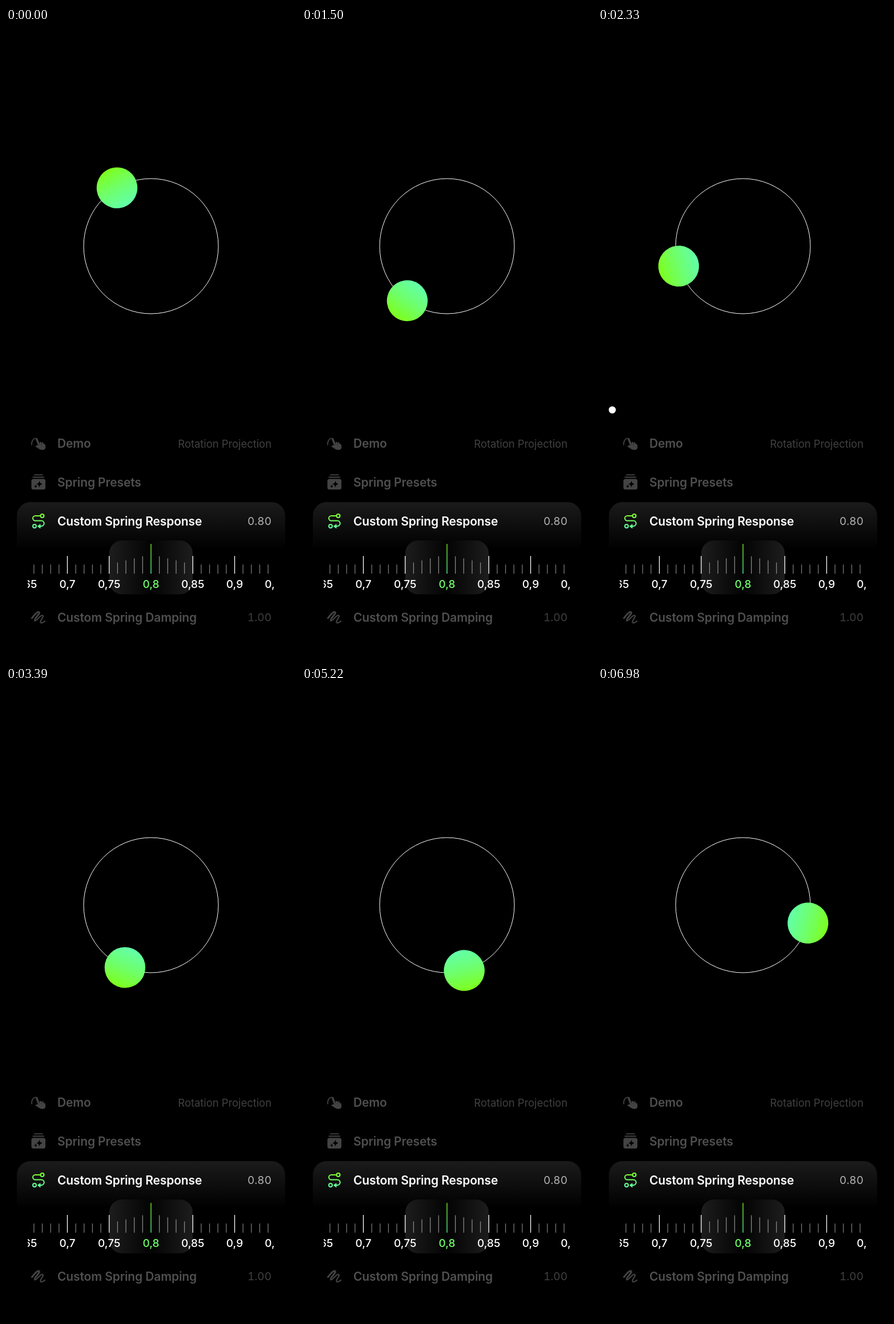
Write an HTML page that moves like this. It is 508 px wide and 1102 px high and loops after 7.65 s.

```html
<!DOCTYPE html>
<html lang="en">
<head>
<meta charset="utf-8">
<title>Rotation Projection</title>
<style>
  html, body { margin: 0; width: 100%; height: 100%; overflow: hidden; background: #000; }
  svg { display: block; width: 100vw; height: 100vh; font-family: Inter, Roboto, sans-serif; }
  .title { font-size: 21px; font-weight: 600; letter-spacing: -.13px; fill: #4f4f4f; }
  .value { font-size: 18.5px; letter-spacing: -.07px; text-anchor: end; fill: #404040; }
  .num { font-size: 19px; letter-spacing: 0; font-variant-numeric: tabular-nums; }
  .label { font-size: 19px; font-weight: 500; text-anchor: middle; fill: #fff; }
  .line { fill: none; stroke-linecap: round; stroke-linejoin: round; }
</style>
</head>
<body>
<svg viewBox="0 0 508 1102">
  <defs>
    <linearGradient id="ballFill">
      <stop stop-color="#62ffaa"/><stop offset=".5" stop-color="#6fff6c"/><stop offset="1" stop-color="#7dff1c"/>
    </linearGradient>
    <linearGradient id="accent" gradientUnits="userSpaceOnUse" x1="0" y1="848" x2="0" y2="875">
      <stop stop-color="#80ff20"/><stop offset="1" stop-color="#60ffb4"/>
    </linearGradient>
    <linearGradient id="needle" gradientUnits="userSpaceOnUse" x1="0" y1="901" x2="0" y2="953">
      <stop stop-color="#80ff20"/><stop offset="1" stop-color="#60ffa8"/>
    </linearGradient>
    <linearGradient id="cardFill" x2="0" y2="1">
      <stop stop-color="#1b1b1b"/><stop offset="1" stop-color="#000"/>
    </linearGradient>
    <linearGradient id="lensFill">
      <stop stop-color="#1d1d1d"/><stop offset=".5" stop-color="#030303"/><stop offset="1" stop-color="#1d1d1d"/>
    </linearGradient>
    <clipPath id="rulerClip"><rect x="38" y="890" width="431.5" height="110"/></clipPath>
  </defs>

  <circle cx="254" cy="381" r="118" fill="none" stroke="#fff"/>
  <g id="arm"><circle cx="372" cy="381" r="35.7" fill="url(#ballFill)"/></g>
  <circle id="dot" cx="25" cy="667" r="6.2" fill="#fff"/>

  <!-- demo -->
  <g stroke="#434343" class="line">
    <path d="M45 728C44.5 723 47 718.5 51 716.5" stroke-width="1.7"/>
    <path d="M53.5 717.5L58.5 730" stroke-width="3.4"/>
    <path d="M60.3 724.5L62 731M64 725L65.3 731M67.2 728L67.6 733" stroke-width="3.2"/>
    <path d="M58 729L67.5 731L67.5 735L63.5 736L59.5 735L52.5 730.5Z" fill="#434343" stroke-width="2"/>
  </g>
  <text class="title" x="90" y="733">Demo</text>
  <text class="value" x="465" y="732.5">Rotation Projection</text>

  <!-- presets -->
  <g fill="#434343">
    <rect x="49" y="779.5" width="15.5" height="1.8" rx=".9"/>
    <rect x="46.5" y="783.5" width="20.5" height="1.9" rx=".9"/>
    <rect x="44.5" y="787.5" width="24.5" height="18.5" rx="3.5"/>
    <path fill="#000" d="M58.5 790.5Q59.2 795.8 64 796.5Q59.2 797.2 58.5 802.5Q57.8 797.2 53 796.5Q57.8 795.8 58.5 790.5ZM52 797.5Q52.4 800.1 55 800.5Q52.4 800.9 52 803.5Q51.6 800.9 49 800.5Q51.6 800.1 52 797.5Z"/>
  </g>
  <text class="title" x="90" y="800.5">Spring Presets</text>

  <!-- response card -->
  <path d="M19 910V852a24 24 0 0 1 24-24H465a24 24 0 0 1 24 24V910Z" fill="url(#cardFill)"/>
  <g class="line" stroke="url(#accent)" stroke-width="2">
    <circle cx="63.5" cy="852" r="3"/>
    <circle cx="50" cy="870" r="3"/>
    <path d="M60 852H51.3a4.3 4.3 0 0 0 0 8.6H62a4.7 4.7 0 0 1 0 9.4H59"/>
    <path d="M55.5 870L60 866.8V873.2Z" fill="url(#accent)" stroke-width="1"/>
  </g>
  <text class="title" x="90" y="868.5" style="fill:#fff">Custom Spring Response</text>
  <text class="value num" x="465" y="868" style="fill:#b4b4b4">0.80</text>
  <rect x="181" y="895" width="146" height="94" rx="22" fill="url(#lensFill)"/>
  <g id="ruler" clip-path="url(#rulerClip)"></g>

  <!-- damping -->
  <g class="line" stroke="#434343">
    <path stroke-width="3" d="M45.5 1030.5C50 1025 55.5 1018 58 1020.3C60.5 1023 48.5 1032 50.5 1035"/>
    <path stroke-width="2.2" d="M50.5 1035C53 1037 61 1023.5 64.5 1026C67 1028.5 59 1034.5 60.5 1038C62 1040.5 65.5 1037.5 68 1036"/>
  </g>
  <text class="title" x="90" y="1036.5">Custom Spring Damping</text>
  <text class="value num" x="465" y="1036">1.00</text>
</svg>
<script>
const $ = id => document.getElementById(id);

function add(tag, attrs, text = '') {
  const el = document.createElementNS('http://www.w3.org/2000/svg', tag);
  for (const k in attrs) el.setAttribute(k, attrs[k]);
  el.textContent = text;
  $('ruler').append(el);
}

// Ruler: one tick per 0.01, a label every 0.05
for (let k = -15; k <= 15; k++) {
  const x = 254 + k * 14.65, major = k % 5 === 0;
  const lift = Math.abs(k) < 5 ? (5 - Math.abs(k)) * 3.6 : 0;
  const top = k === 0 ? 901 : major ? 922 : 937 - lift;
  if (Math.abs(k) < 15) add('rect', {
    x: x - .65, y: top, width: 1.3, height: 953 - top,
    fill: k === 0 ? 'url(#needle)' : major ? '#fff' : lift ? '#868686' : '#777'
  });
  if (major) add('text', { class: 'label', x, y: 978, style: k ? '' : 'fill:#70ff6c' },
    String((80 + k) / 100).replace('.', ','));
}

const LOOP = 7650, OMEGA = 2 * Math.PI / .8;

// Finger drag: [time s, angle deg, speed deg/s]
const drag = [[.21, 239.7, -450], [.96, -204.7, -680], [1.5, -593.1, -765], [1.905, -920.3, -812]];

// Released swings: [start s, from deg, to deg, settled s]
const swings = [[1.905, -920.3, -1327.3, 3.39], [3.75, 112.7, 435.2, 5.22], [5.53, 75.2, 375.4, 6.98]];

function hermite([t0, a, va], [t1, b, vb], t) {
  const h = t1 - t0, u = (t - t0) / h, w = 1 - u;
  return w * w * (1 + 2 * u) * a + u * u * (3 - 2 * u) * b + h * u * w * (w * va - u * vb);
}

// Critically damped spring whose target is half a second of speed ahead
function spring([start, from, to], t) {
  const s = t - start;
  return to + (from - to) * (1 + (OMEGA - 2) * s) * Math.exp(-OMEGA * s);
}

function angleAt(t) {
  if (t <= drag[0][0]) return drag[0][1];
  const i = drag.findIndex(key => t < key[0]);
  if (i > 0) return hermite(drag[i - 1], drag[i], t);
  return spring(swings.findLast(s => t >= s[0]), t);
}

function draw(now) {
  const t = now % LOOP / 1000;
  $('arm').setAttribute('transform', `rotate(${angleAt(t)} 254 381)`);
  const moving = swings.some(([start, , , end]) => t >= start && t < end);
  $('dot').setAttribute('visibility', moving ? 'visible' : 'hidden');
}

const begin = performance.now();
function frame() {
  draw(performance.now() - begin);
  requestAnimationFrame(frame);
}
frame();
</script>
</body>
</html>
```
